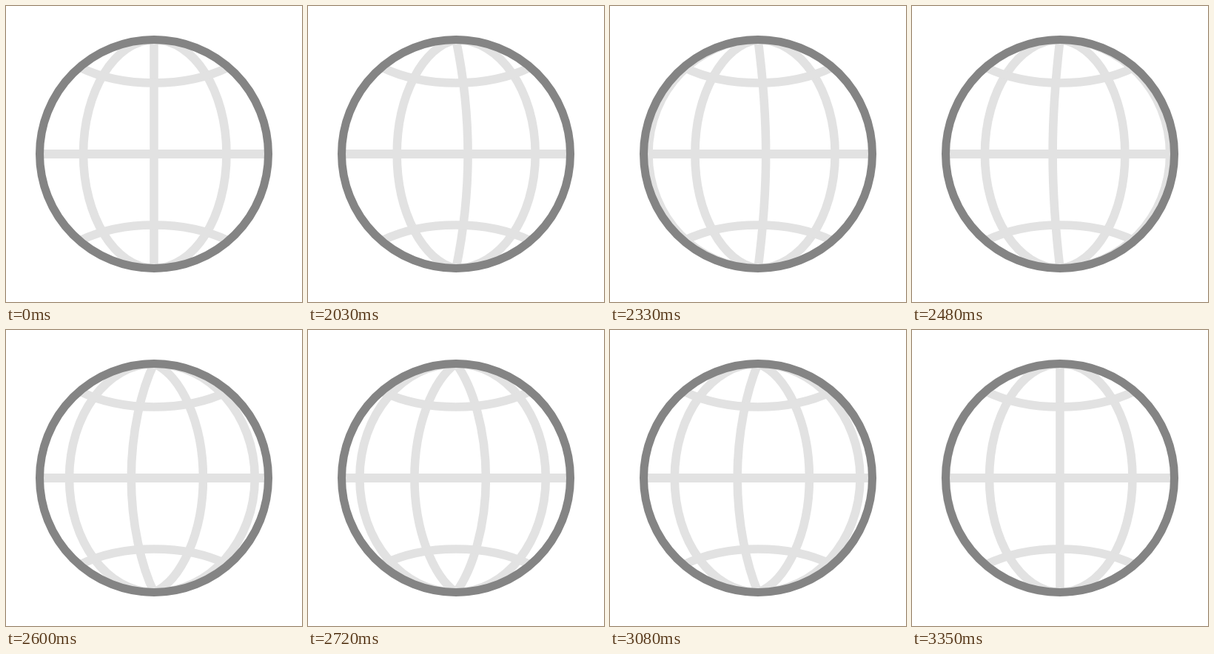
Animation, 400 px wide and 400 px high, one loop 3440 ms. Source, as an HTML page with a canvas:

```html
<!DOCTYPE html>
<html lang="en">
<head>
<meta charset="utf-8">
<title>Spinning globe</title>
<style>
  html, body { margin: 0; width: 100%; height: 100%; overflow: hidden; background: #fff; }
  canvas { display: block; width: 400px; height: 400px; }
</style>
</head>
<body>
<canvas id="stage" width="400" height="400"></canvas>
<script>
const ctx = document.getElementById('stage').getContext('2d');
const LOOP = 3440, SPIN_START = 2030, STEP = 30, LAST_STEP = 44;
const RADIUS = 154.5, RING_WIDTH = 11, GRID_WIDTH = 11.6, KAPPA = 0.5523;
const GRID = '#e2e2e2', RING = '#848484';
// Equator crossings; each meridian travels from one slot to the next.
const SLOTS = [-RADIUS, -95.5, 0, 98, RADIUS];

const lerp = (a, b, t) => a + (b - a) * t;

// Number of slots travelled: quadratic ease in, then out.
function travel(ms) {
  if (ms < SPIN_START) return 0;
  const i = Math.min(LAST_STEP, Math.floor((ms - SPIN_START) / STEP));
  return i < 20.6 ? 0.0042 * (i + 6.25) ** 2 : 5 - 0.0036 * (LAST_STEP - i) ** 2;
}

function stroke(color, width, trace) {
  ctx.beginPath();
  trace();
  ctx.strokeStyle = color;
  ctx.lineWidth = width;
  ctx.stroke();
}

// Straight at x = 0, pointed when narrow, a true half ellipse when wide.
function meridian(x) {
  const bend = Math.min(1, Math.abs(x) / 97);
  const y1 = RADIUS - (1 - bend) * RADIUS / 3;
  const y2 = lerp(RADIUS / 3, RADIUS * KAPPA, bend);
  stroke(GRID, GRID_WIDTH, () => {
    ctx.moveTo(0, -RADIUS);
    ctx.bezierCurveTo(x * KAPPA, -y1, x, -y2, x, 0);
    ctx.bezierCurveTo(x, y2, x * KAPPA, y1, 0, RADIUS);
  });
}

function parallel(side) {
  stroke(GRID, GRID_WIDTH, () => {
    ctx.moveTo(-100, side * 117);
    ctx.bezierCurveTo(-42, side * 89, 42, side * 89, 100, side * 117);
  });
}

function draw(ms) {
  ctx.setTransform(1, 0, 0, 1, 0, 0);
  ctx.fillStyle = '#fff';
  ctx.fillRect(0, 0, 400, 400);
  ctx.translate(200, 200);

  const moved = travel(ms), part = moved % 1;
  // The incoming meridian stays hidden for the first step.
  const first = moved < 0.2 ? 1 : 0;
  for (let k = first; k < SLOTS.length - 1; k++) {
    meridian(lerp(SLOTS[k], SLOTS[k + 1], part));
  }
  parallel(-1);
  parallel(1);
  stroke(GRID, 12, () => { ctx.moveTo(-RADIUS, 0); ctx.lineTo(RADIUS, 0); });
  stroke(RING, RING_WIDTH, () => ctx.arc(0, 0, RADIUS, 0, Math.PI * 2));
}

const start = performance.now();
function tick() {
  draw((performance.now() - start) % LOOP);
  requestAnimationFrame(tick);
}
tick();
</script>
</body>
</html>
```
